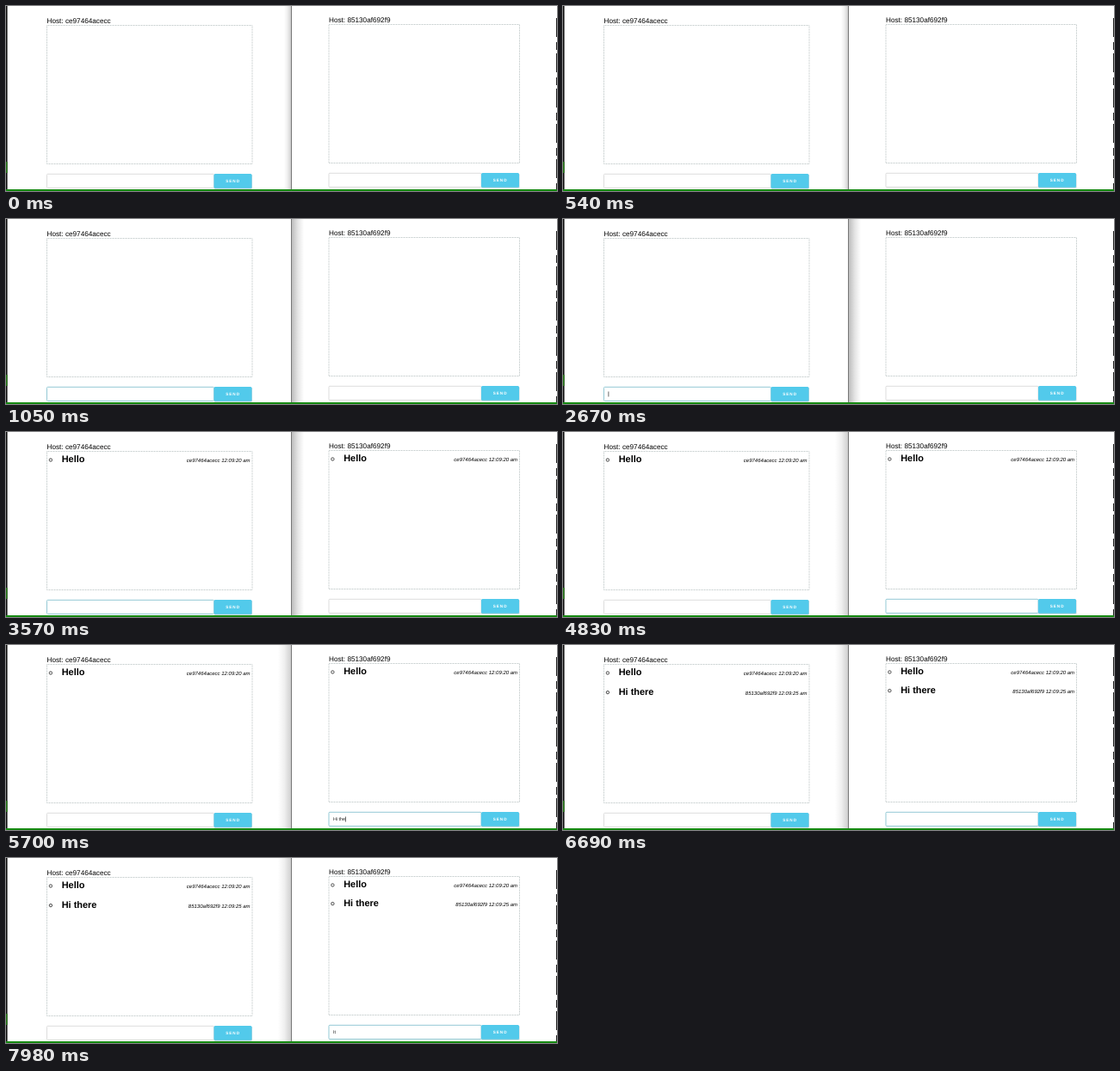
Recreate the animation shown at these times as an HTML page. Size 640 by 215 pixels, loop 8 s.

```html
<!DOCTYPE html>
<html lang="en">
<head>
<meta charset="utf-8">
<title>Two chat windows</title>
<style>
  html, body { margin: 0; width: 100%; height: 100%; overflow: hidden; background: #fff; }
  svg { display: block; }
  text { font-family: "Liberation Sans", Arial, sans-serif; text-rendering: geometricPrecision; white-space: pre; }
  .host { font-size: 8.2px; }
  .message { font-size: 10.95px; font-weight: bold; }
  .stamp { font-size: 6px; font-style: italic; text-anchor: end; }
  .typed { font-size: 5.4px; fill: #222; }
  .send { font-size: 4.7px; font-weight: bold; letter-spacing: .95px; fill: #fff; }
  .bullet { fill: none; stroke: #222; stroke-width: .8; }
  .log { fill: none; stroke: #c9d0d0; stroke-dasharray: 1 .5; }
</style>
</head>
<body>
<svg id="stage" width="640" height="215" viewBox="0 0 640 215">
  <defs>
    <linearGradient id="toRight"><stop stop-color="#bdbdbd"/><stop offset=".5" stop-color="#e4e4e4"/><stop offset="1" stop-color="#fff"/></linearGradient>
    <linearGradient id="toLeft"><stop stop-color="#fff"/><stop offset=".5" stop-color="#efefef"/><stop offset="1" stop-color="#cfcfcf"/></linearGradient>
  </defs>
  <rect width="640" height="215" fill="#fff"/>
  <rect id="shadow" height="213"/>
  <path d="M331.5 0V213" stroke="#777"/>
  <path d="M.8 0V213" stroke="#111" stroke-width="1.6"/>
  <path d="M.8 181V194" stroke="#2a7a1a" stroke-width="1.6"/>
  <path d="M639.5 14V213" stroke="#222" stroke-dasharray="22 6 9 4"/>
  <g id="windows"></g>
  <rect y="213" width="640" height="2" fill="#168a12"/>
</svg>
<script>
const LOOP = 8000;
const $ = id => document.getElementById(id);

const windows = [
  {
    id: "left", host: "ce97464acecc", x: 47.5, y: 22.5, width: 238.5, rowGap: 22.6, inputWidth: 194,
    focus: [600, 4230],
    typing: [[0, ""], [1740, "H"], [2040, "He"], [2190, "Hel"], [2310, "Hell"], [2430, "Hello"], [2670, ""]],
    caret: [[600, 1050], [1500, 3180], [3640, 4020]]
  },
  {
    id: "right", host: "85130af692f9", x: 375, y: 21.5, width: 221.5, rowGap: 21.6, inputWidth: 177,
    focus: [4230, LOOP],
    typing: [[0, ""], [5070, "H"], [5190, "Hi"], [5340, "Hi "], [5460, "Hi t"], [5580, "Hi th"], [5700, "Hi the"],
             [5880, "Hi ther"], [6060, "Hi there"], [6240, ""], [7410, "I"], [7530, "It"]],
    caret: [[4230, 4640], [5070, 6690], [7150, 7900]]
  }
];

const messages = [
  { time: 2730, text: "Hello", stamp: "ce97464acecc 12:09:20 am" },
  { time: 6240, text: "Hi there", stamp: "85130af692f9 12:09:25 am" }
];

// Which window casts its shadow over the other
const shadows = [
  [0, 323, 8, "toLeft"],
  [570, 332, 14, "toRight"],
  [4140, 323, 8, "toLeft"],
  [4230, 316, 15, "toLeft"]
];

const latest = (steps, t) => steps.findLast(([start]) => start <= t);
const within = ([start, end], t) => t >= start && t < end;

const messageMarkup = ({ x, y, width, rowGap, id }) => messages.map((m, i) => {
  const row = y + i * rowGap;
  return `<g id="${id}-message${i}">
    <circle class="bullet" cx="${x + 4.4}" cy="${row + 10}" r="1.7"/>
    <text class="message" x="${x + 17.2}" y="${row + 12.9}">${m.text}</text>
    <text class="stamp" x="${x + width - 2.4}" y="${row + 12.6}">${m.stamp}</text>
  </g>`;
}).join("");

const windowMarkup = w => {
  const { id, x, y, width, inputWidth } = w;
  const inputY = y + 172.8;
  const buttonX = x + inputWidth;
  return `
    <text class="host" x="${x}" y="${y - 2.2}">Host: ${w.host}</text>
    <rect class="log" x="${x}" y="${y}" width="${width}" height="161"/>
    ${messageMarkup(w)}
    <rect id="${id}-input" x="${x}" y="${inputY}" width="${inputWidth}" height="16.2" rx="1" fill="#fff"/>
    <text id="${id}-typed" class="typed" x="${x + 5}" y="${y + 182.8}"></text>
    <rect id="${id}-caret" y="${y + 178}" width=".8" height="6" fill="#444"/>
    <rect x="${buttonX}" y="${inputY + .5}" width="44.5" height="17" rx="1.5" fill="#c4d6dc"/>
    <rect x="${buttonX}" y="${inputY - .3}" width="44" height="16.8" rx="1.5" fill="#52caeb"/>
    <text class="send" x="${buttonX + 13.7}" y="${y + 182.9}">SEND</text>`;
};

$("windows").innerHTML = windows.map(windowMarkup).join("");

function setAttributes(element, attributes) {
  for (const [name, value] of Object.entries(attributes)) element.setAttribute(name, value);
}

function drawWindow({ id, x, focus, typing, caret }, t) {
  const typed = $(id + "-typed");
  typed.textContent = latest(typing, t)[1];
  setAttributes($(id + "-input"), { stroke: within(focus, t) ? "#93c9d5" : "#dcdcdc" });
  setAttributes($(id + "-caret"), {
    x: x + 5 + typed.getComputedTextLength(),
    opacity: caret.some(span => within(span, t)) ? 1 : 0
  });
  messages.forEach((m, i) => setAttributes($(`${id}-message${i}`), { opacity: t >= m.time ? 1 : 0 }));
}

function draw(now) {
  const t = now % LOOP;
  const [, x, width, gradient] = latest(shadows, t);
  setAttributes($("shadow"), { x, width, fill: `url(#${gradient})` });
  windows.forEach(w => drawWindow(w, t));
}

const start = performance.now();
function tick() {
  draw(performance.now() - start);
  requestAnimationFrame(tick);
}
tick();
</script>
</body>
</html>
```
